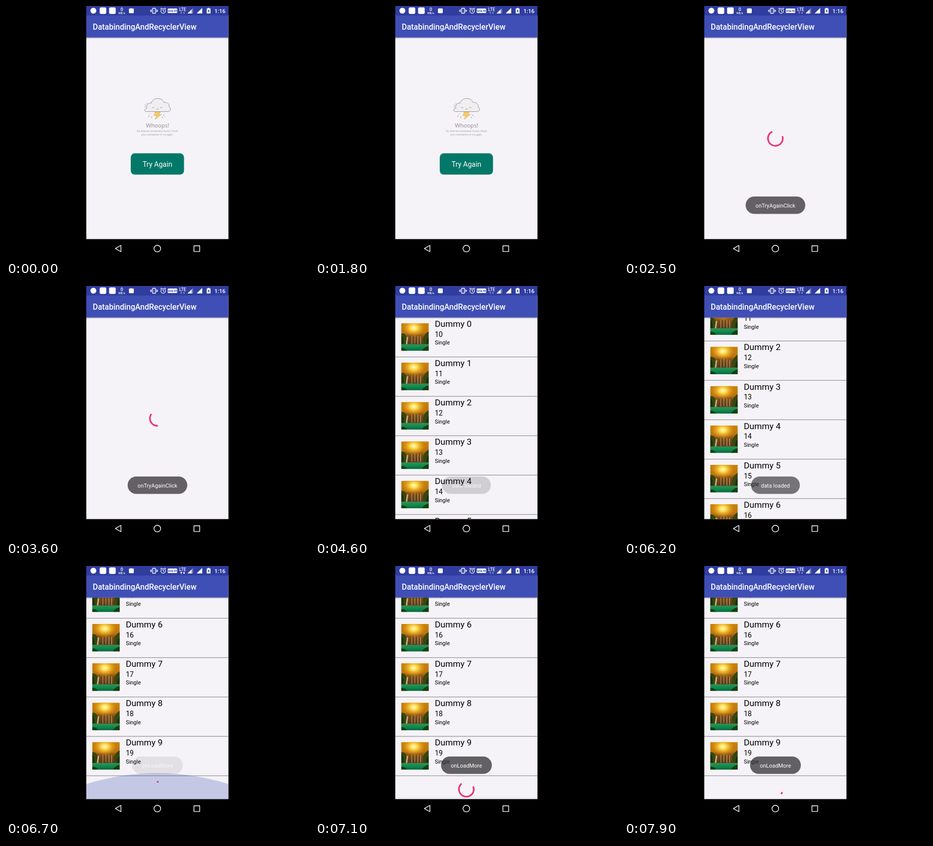
These frames come from a looping animation (600x500 px, 8000 ms). An HTML page:

```html
<!DOCTYPE html>
<html lang="en">
<head>
<meta charset="utf-8">
<title>Recycler list demo</title>
<style>
  html, body { margin: 0; width: 100%; height: 100%; overflow: hidden; background: #000; }
  svg { display: block; }
  text { font-family: Roboto, sans-serif; }
  .mid { text-anchor: middle; }
  .bold { font-weight: 500; }
  .soft { font-family: "Open Sans", sans-serif; }
</style>
</head>
<body>
<svg id="stage" width="600" height="500" viewBox="0 0 600 500">
  <defs>
    <clipPath id="page"><rect x="159" y="62.5" width="281.5" height="400"/></clipPath>
    <clipPath id="frame"><rect width="54.6" height="54.6"/></clipPath>
    <linearGradient id="shade" x2="0" y2="1">
      <stop offset="0" stop-color="#000" stop-opacity=".28"/>
      <stop offset="1" stop-color="#000" stop-opacity="0"/>
    </linearGradient>
    <linearGradient id="leaves" x2="0" y2="1">
      <stop offset="0" stop-color="#c98208"/>
      <stop offset=".35" stop-color="#bd7410"/>
      <stop offset=".5" stop-color="#7a4a14"/>
      <stop offset=".78" stop-color="#54381a"/>
    </linearGradient>
    <radialGradient id="sun">
      <stop offset="0" stop-color="#fffbd0"/>
      <stop offset=".3" stop-color="#ffdc50"/>
      <stop offset="1" stop-color="#eda010" stop-opacity="0"/>
    </radialGradient>
    <linearGradient id="water" x2="0" y2="1">
      <stop offset="0" stop-color="#3f8a55"/>
      <stop offset=".4" stop-color="#10904f"/>
      <stop offset="1" stop-color="#06693f"/>
    </linearGradient>
    <g id="photo" clip-path="url(#frame)">
      <rect width="54.6" height="54.6" fill="url(#leaves)"/>
      <ellipse cx="25" cy="9" rx="23" ry="17" fill="url(#sun)"/>
      <path d="M0 20Q8 19 11 28L9 45H0ZM54.6 16Q45 21 43 32L46 45H54.6Z" fill="#36470f"/>
      <path d="M0 24Q6 28 5 42H0ZM54.6 28Q48 31 50 44H54.6Z" fill="#1d330c"/>
      <g stroke="#e6cfa4" fill="none">
        <path d="M12.5 27Q11.5 34 10.5 43" stroke-width="3" opacity=".75"/>
        <path d="M21 25V41M27 24V40" stroke-width="1.3" opacity=".55"/>
        <path d="M33 25V41M38.5 26V41" stroke-width="1.5" opacity=".6"/>
      </g>
      <rect y="41.5" width="54.6" height="13.1" fill="url(#water)"/>
      <path d="M0 49Q6 47 12 54.6H0ZM54.6 45Q45 47 41 54.6H54.6Z" fill="#14400f"/>
    </g>
  </defs>

  <rect width="600" height="500"/>
  <rect x="159" y="18" width="281.5" height="444.5" fill="#f5f3f7"/>

  <g id="error">
    <g fill="none" stroke="#8e8d90" stroke-width=".9" stroke-linecap="round" stroke-linejoin="round">
      <path fill="#efeef1" d="M278 209.5C273 209.5 273.5 203 279 203C277 196 282 191.500 287.500 193C290 181 309 180 313 191.500C320 190.500 324 195 323 200C327.500 202 326.500 209.500 321 209.500Z"/>
      <path d="M290 201.500h3M306 201.500h3M298.500 204.500q1.500-1 3 0M275 196l1.500 1M276.500 200h-2M279 193.500v1.500"/>
      <path d="M284 217l-2 3M289 219l-1 3M311 216l3 2M309 220l1.500 2.500M286 213.500l-1 1M315 220.500l.5.500"/>
      <path fill="#f7cb62" stroke="#c99c55" stroke-width=".6" d="M296 210H306L302.500 215H307.500L295.500 225L298.500 217.500H293Z"/>
    </g>
    <text class="mid soft" x="300" y="241" font-size="11.2" fill="#8a898c">Whoops!</text>
    <g class="soft" font-size="4.75" fill="#98979b">
      <text class="mid soft" x="299.700" y="250">No internet connection found. Check</text>
      <text class="mid soft" x="299.700" y="257">your connection or try again.</text>
    </g>
    <rect x="247" y="292.300" width="105.500" height="42.300" rx="8" fill="#047868"/>
    <text class="mid" x="299.800" y="319.300" font-size="14.060" fill="#fff">Try Again</text>
  </g>

  <g clip-path="url(#page)">
    <g id="list"></g>
    <path id="spin" fill="none" stroke="#f02f73" stroke-width="3.100" stroke-linecap="square"/>
    <path id="glow" d="M159 0V-30Q299.750-73 440.500-30V0Z" fill="#3f51b5"/>
  </g>

  <rect x="159" y="62.500" width="281.500" height="3" fill="url(#shade)"/>
  <rect x="159" width="281.500" height="19" fill="#303d9f"/>
  <rect x="159" y="18.800" width="281.500" height="43.800" fill="#3f4fb5"/>
  <text class="bold" x="171.700" y="47.200" font-size="15.620" fill="#fff">DatabindingAndRecyclerView</text>

  <g fill="#fff">
    <circle cx="173" cy="9.300" r="5.800"/>
    <rect x="185.500" y="2.800" width="13" height="13" rx="3"/>
    <rect x="204.200" y="2.800" width="13" height="13" rx="2.500"/>
    <text class="mid bold" x="229.300" y="9.500" font-size="9">0</text>
    <text class="mid bold" x="229.300" y="16.200" font-size="6">KB/s</text>
    <rect x="243.500" y="4.700" width="9.500" height="9.500" rx="1.500"/>
    <path fill="none" stroke="#fff" stroke-width="1.300" d="M290.500 4.500h5.200v10h-5.200zM288 6.500v6M298.200 6.500v6M286.300 8v3M299.900 8v3"/>
    <g fill="none" stroke="#fff" stroke-width="1.200">
      <circle cx="311.300" cy="9.800" r="4.500"/>
      <path d="M311.300 7v3l2 1.300M306 5.800l2.500-2.200M316.600 5.800l-2.500-2.200"/>
    </g>
    <rect x="320.300" y="5" width="18.800" height="9" rx="1.500"/>
    <text class="mid" x="329.700" y="11.800" font-size="6" font-weight="700" style="fill:#303d9f">VOLTE</text>
    <text class="mid bold" x="349.800" y="9.700" font-size="8.300">LTE</text>
    <path id="data" d="M347 11l2.300 2.500h-1.500v2h-1.600v-2h-1.500zM352.500 16l2.300-2.500h-1.500v-2h-1.600v2h-1.500z"/>
    <path opacity=".35" d="M359.500 14.800h11v-11z"/>
    <path d="M359.500 14.800h8v-8zM377.500 14.800h11v-11z"/>
    <path d="M397.500 5h2v-1.300h3.500V5h2v9.800h-7.500z"/>
    <path d="M402 6.500l-2.800 4h1.700v3l2.600-4h-1.500z" fill="#303d9f"/>
    <text class="bold" x="412.700" y="13.600" font-size="11.100">1:16</text>
  </g>

  <g fill="none" stroke="#fff" stroke-width="1.400" stroke-linejoin="round">
    <path d="M227.500 475v12.500L216.500 481.200Z"/>
    <circle cx="299.700" cy="481.300" r="6.600"/>
    <rect x="372.200" y="475.800" width="11.300" height="11.300"/>
  </g>

  <g id="toast">
    <rect y="378" height="34.500" rx="17.200" fill="#332f33" fill-opacity=".75"/>
    <text class="mid" x="299.900" y="399.500" font-size="10.930" fill="#fff"></text>
  </g>
</svg>
<script>
const LOOP = 8000, STEP = 100;
const TOP = 62.6, ROW = 78.15, BOTTOM = 462.5, CX = 299.7, R = 14.7;
const CLICK = 2050, LOADED = 3700, MORE = 6685, HIT = 6550;
const TOASTS = [
  { text: 'onTryAgainClick', width: 118, from: 2100, to: 4150 },
  { text: 'data loaded', width: 96.6, from: 4500, to: 6150 },
  { text: 'onLoadMore', width: 100.5, from: 6650, to: 9000 }
];
const SCROLL = [[5700, 0], [5800, 10.2], [6000, 50], [6200, 109.8],
  [6300, 165], [6400, 250], [6500, 345], [6600, 427.9]];

const $ = id => document.getElementById(id);
const clamp = x => Math.min(1, Math.max(0, x));
const show = (el, alpha) => el.setAttribute('opacity', +alpha);

$('list').innerHTML = Array.from({ length: 10 }, (_, i) => `
  <g transform="translate(159 ${TOP + i * ROW})">
    <use class="pic" href="#photo" x="11.700" y="11.300"/>
    <text x="78.200" y="18.300" font-size="17.180">Dummy ${i}</text>
    <text x="78.200" y="38" font-size="14.060">${10 + i}</text>
    <text x="78.200" y="53.700" font-size="10.930">Single</text>
    <rect y="${ROW - .6}" width="281.500" height="1.200" fill="#929194"/>
  </g>`).join('');
const pics = document.querySelectorAll('.pic');
const [pill, label] = $('toast').children;

function along(keys, t) {
  if (t <= keys[0][0]) return keys[0][1];
  for (let i = 1; i < keys.length; i++) {
    const [a, x] = keys[i - 1], [b, y] = keys[i];
    if (t < b) return x + (y - x) * (t - a) / (b - a);
  }
  return keys[keys.length - 1][1];
}

// Cubic bezier easing, solved by bisection.
function ease(x, x1, x2) {
  let lo = 0, hi = 1, s = .5;
  for (let i = 0; i < 24; i++) {
    s = (lo + hi) / 2;
    const bx = 3 * s * (1 - s) * ((1 - s) * x1 + s * x2) + s ** 3;
    if (bx < x) lo = s; else hi = s;
  }
  return s * s * (3 - 2 * s);
}

// Material indeterminate ring: the head runs ahead, then the tail catches up.
function ring(age, cy) {
  const u = age / 1333 % 1;
  const turn = age * 720 / 6665 + u * 90;
  const tail = turn + 270 * ease(clamp(u * 2 - 1), .4, .2);
  const head = turn + 270 * ease(clamp(u * 2), .4, .2) + .5;
  const at = deg => {
    const a = deg * Math.PI / 180;
    return `${CX + R * Math.sin(a)} ${cy - R * Math.cos(a)}`;
  };
  return `M${at(tail)}A${R} ${R} 0 ${+(head - tail > 180)} 1 ${at(head)}`;
}

function toast(t) {
  const cur = TOASTS.find(o => t >= o.from && t < o.to + 400);
  show($('toast'), cur ? Math.min(clamp((t - cur.from) / 400), 1 - clamp((t - cur.to) / 400)) : 0);
  if (!cur) return;
  label.textContent = cur.text;
  pill.setAttribute('width', cur.width);
  pill.setAttribute('x', 299.9 - cur.width / 2);
}

function draw(t) {
  show($('error'), t < CLICK);
  show($('list'), t >= LOADED);
  $('list').setAttribute('transform', `translate(0 ${-along(SCROLL, t)})`);
  pics.forEach(p => show(p, clamp((t - LOADED + 100) / 300)));

  const first = t >= CLICK && t < LOADED, more = t >= MORE;
  show($('spin'), first || more);
  if (first) $('spin').setAttribute('d', ring(t - CLICK, 262.7));
  if (more) $('spin').setAttribute('d', ring(t - MORE, 443));

  const fade = (1 - clamp((t - HIT - 150) / 600)) ** 2;
  const size = clamp((t - HIT) / 150) * fade;
  $('glow').setAttribute('transform', `translate(0 ${BOTTOM}) scale(1 ${size})`);
  show($('glow'), .27 * size);

  show($('data'), t >= 6600 && t < 7000 ? 1 : .4);
  toast(t);
}

const start = performance.now();
function tick() {
  const t = (performance.now() - start) % LOOP;
  draw(Math.floor(t / STEP) * STEP);
  requestAnimationFrame(tick);
}
tick();
</script>
</body>
</html>
```
